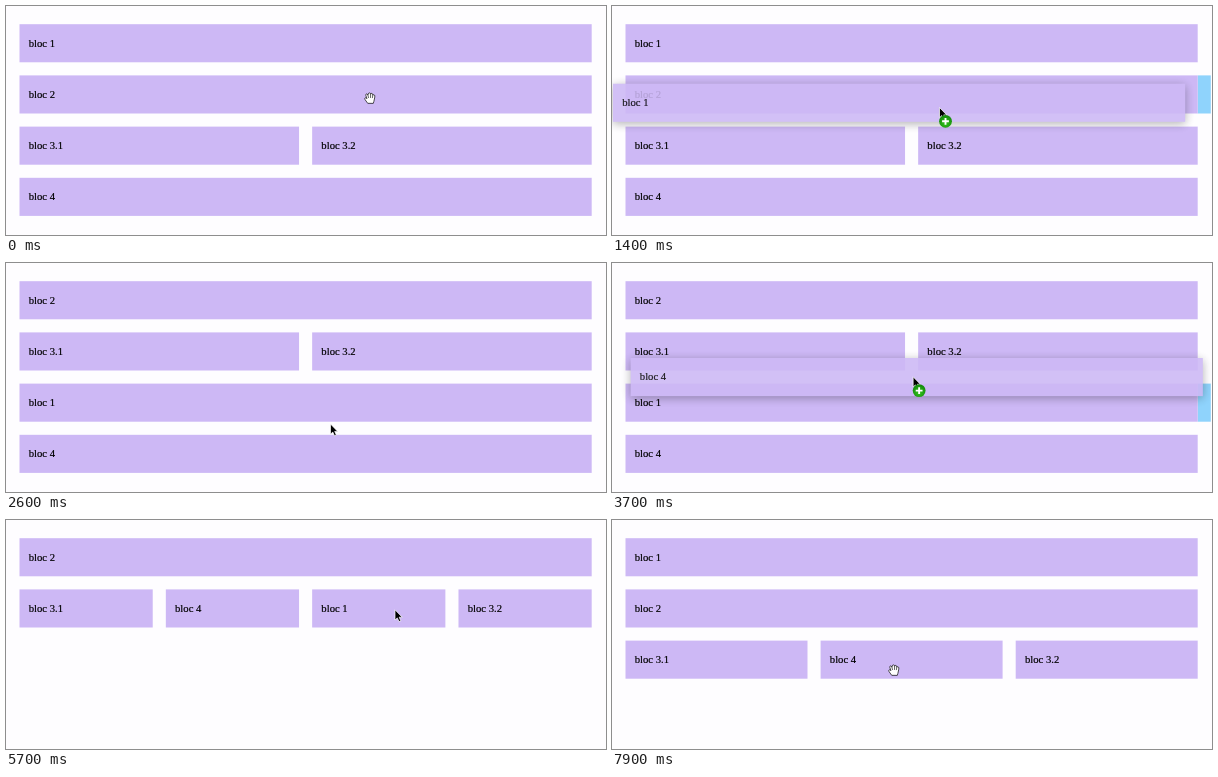
Recreate the animation shown at these times as an HTML page. Size 600x229 px, loop 8000 ms.

```html
<!DOCTYPE html>
<html lang="en">
<head>
<meta charset="utf-8">
<title>Drag and drop blocks</title>
<style>
  html, body { margin: 0; width: 100%; height: 100%; overflow: hidden; background: #fefdff; }
  svg { display: block; width: 600px; height: 229px; }
  text { font: 10.67px "Liberation Serif", Times, serif; fill: #000; stroke: #000; stroke-width: .18px; }
  .block { fill: #cdb8f5; }
  #bar { fill: #8fd3fc; }
  #ghost { filter: drop-shadow(0 2px 5px rgba(0, 0, 0, .34)); }
</style>
</head>
<body>
<svg viewBox="0 0 600 229">
  <defs>
    <radialGradient id="green" cx=".5" cy=".65" r=".6">
      <stop offset="0" stop-color="#35c51c"/>
      <stop offset="1" stop-color="#138a0c"/>
    </radialGradient>
  </defs>
  <rect width="600" height="229" fill="#fefdff"/>
  <rect id="bar"/>
  <g id="blocks"></g>
  <g id="fade"><g id="ghost"></g></g>
  <g id="arrow">
    <path d="M0 0V10.2L2.3 8.1L4 11.8L5.8 11L4.2 7.4H7.2Z" fill="#000" stroke="#fff" stroke-width=".7" stroke-linejoin="round"/>
    <g id="badge" transform="translate(6 13.8)">
      <circle r="6.4" fill="url(#green)"/>
      <path d="M-3.4 0H3.4M0 -3.4V3.4" stroke="#fff" stroke-width="1.9"/>
    </g>
  </g>
  <g id="hand" stroke="#222" stroke-width=".8" stroke-linejoin="round" stroke-linecap="round">
    <path fill="#fff" d="M-2.5 5L-4.9 1.7Q-5.7 .3-4.8-.2Q-4-.6-3 .7L-4.2-2.6Q-4.4-4-3.4-4.1Q-2.6-4.1-2.1-2.9L-1.8-4Q-1.5-5.2-.4-5.1Q.6-5 .6-3.8Q1-4.9 2-4.6Q3-4.2 2.8-2.9Q3.6-3.6 4.4-3Q5-2.4 4.8-1L4.2 2Q3.9 3.6 3.4 5Z"/>
    <path fill="none" stroke-width=".7" d="M-2.1-2.9L-1.5-.4M.6-3.8L.5-.5M2.8-2.9L2.4-.3"/>
  </g>
</svg>
<script>
const LOOP = 8000, STEP = 100;
const LEFT = 13.5, WIDTH = 572.2, TOP = 18.2, PITCH = 51.2, HIGH = 38.1, GAP = 13.1;

// Places the pointer passes or rests at: time, x, y
const path = [
  [0, 364, 92], [450, 31, 150], [650, 120, 187], [900, 340, 42],
  [1400, 327.5, 101.5], [1850, 324.5, 161], [2650, 324.5, 161],
  [3000, 296, 190.6], [3250, 296, 190.6], [3930, 303, 86], [4600, 303, 86],
  [4800, 333.5, 138], [4900, 333.5, 138], [5000, 352, 129], [5500, 389, 89.8],
  [5800, 389, 89.8], [6500, 400, 92], [7150, 422, 13], [7400, 422, 13],
  [7700, 42, 95], [7900, 282, 150], [LOOP, 282, 150]
];

const drags = [
  { name: "1", from: 900, to: 2500 },
  { name: "4", from: 3250, to: 4600 },
  { name: "1", from: 4900, to: 5700 },
  { name: "1", from: 6500, to: 7400 }
];

const $ = id => document.getElementById(id);
const put = (el, attrs) => { for (const k in attrs) el.setAttribute(k, attrs[k]); };
const show = (id, on) => put($(id), { display: on ? "inline" : "none" });
const rowTop = r => TOP + r * PITCH;

// Tangent that never overshoots neighbouring points
function slope(i, k) {
  const a = path[i - 1], b = path[i], c = path[i + 1];
  if (!a || !c) return 0;
  const u = (b[k] - a[k]) / (b[0] - a[0]), v = (c[k] - b[k]) / (c[0] - b[0]);
  return u * v > 0 ? 2 * u * v / (u + v) : 0;
}

function pointer(t) {
  const i = path.findIndex(p => p[0] > t) - 1;
  const a = path[i], b = path[i + 1], h = b[0] - a[0], s = (t - a[0]) / h, q = 1 - s;
  return [1, 2].map(k =>
    a[k] * (1 + 2 * s) * q * q + b[k] * s * s * (3 - 2 * s)
    + h * (slope(i, k) * s * q * q - slope(i + 1, k) * s * s * q));
}

// Blocks of a row share its width
function place(rows) {
  return rows.flatMap((row, r) => {
    const w = (WIDTH - GAP * (row.length - 1)) / row.length;
    return row.map((name, c) => ({ name, r, c, x: LEFT + c * (w + GAP), y: rowTop(r), w }));
  });
}

// Drop spot: a slot in row r, or a new row before r when there is no slot
function spot(rows, [x, y]) {
  const r = Math.floor((y - TOP) / PITCH);
  if (!rows[r] || y > rowTop(r) + HIGH) return { r: r + 1 };
  const next = place(rows).find(b => b.r === r && x < b.x + b.w / 2);
  return { r, slot: next ? next.c : rows[r].length, x: next ? next.x - GAP : LEFT + WIDTH };
}

function move(rows, name, { r, slot }) {
  const out = rows.map(row => row.filter(n => n !== name));
  if (slot === undefined) out.splice(r, 0, [name]);
  else out[r].splice(slot, 0, name);
  return out.filter(row => row.length);
}

// Each drop gives the next arrangement
const layouts = [{ t: 0, rows: [["1"], ["2"], ["3.1", "3.2"], ["4"]] }];
for (const d of drags) {
  const { rows } = layouts.at(-1);
  layouts.push({ t: d.to, rows: move(rows, d.name, spot(rows, pointer(d.to))) });
}

const draw = b =>
  `<rect class="block" x="${b.x}" y="${b.y}" width="${b.w}" height="${HIGH}"/>` +
  `<text x="${b.x + 9.2}" y="${b.y + 22.4}">bloc ${b.name}</text>`;

function mark(rows, p) {
  const { r, slot, x } = spot(rows, p);
  return slot === undefined
    ? { x: 0, y: rowTop(r) - GAP, width: 599, height: GAP }
    : { x, y: rowTop(r), width: GAP, height: HIGH };
}

const inside = (b, [x, y]) => x >= b.x && x <= b.x + b.w && y >= b.y && y <= b.y + HIGH;

function render(t) {
  const { rows } = layouts.findLast(l => l.t <= t);
  const boxes = place(rows);
  const drag = drags.find(d => t >= d.from && t < d.to);
  const p = pointer(t);
  $("blocks").innerHTML = boxes.map(draw).join("");

  for (const id of ["bar", "fade", "badge"]) show(id, drag);
  if (drag) {
    put($("bar"), mark(rows, pointer(t - STEP)));
    const b = boxes.find(o => o.name === drag.name), g = pointer(drag.from);
    $("ghost").innerHTML = draw({ ...b, x: b.x + p[0] - g[0], y: b.y + p[1] - g[1] });
    put($("fade"), { opacity: 0.88 * Math.min(1, (t - drag.from) / 300) });
  }

  const dropped = drags.some(d => t >= d.to && t < d.to + STEP);
  const open = !drag && !dropped && boxes.some(b => inside(b, p));
  show("hand", open);
  show("arrow", !open);
  for (const id of ["hand", "arrow"]) put($(id), { transform: `translate(${p})` });
}

const start = performance.now();
let last = -1;
function tick() {
  const t = Math.floor((performance.now() - start) % LOOP / STEP) * STEP;
  if (t !== last) render(last = t);
  requestAnimationFrame(tick);
}
tick();
</script>
</body>
</html>
```
